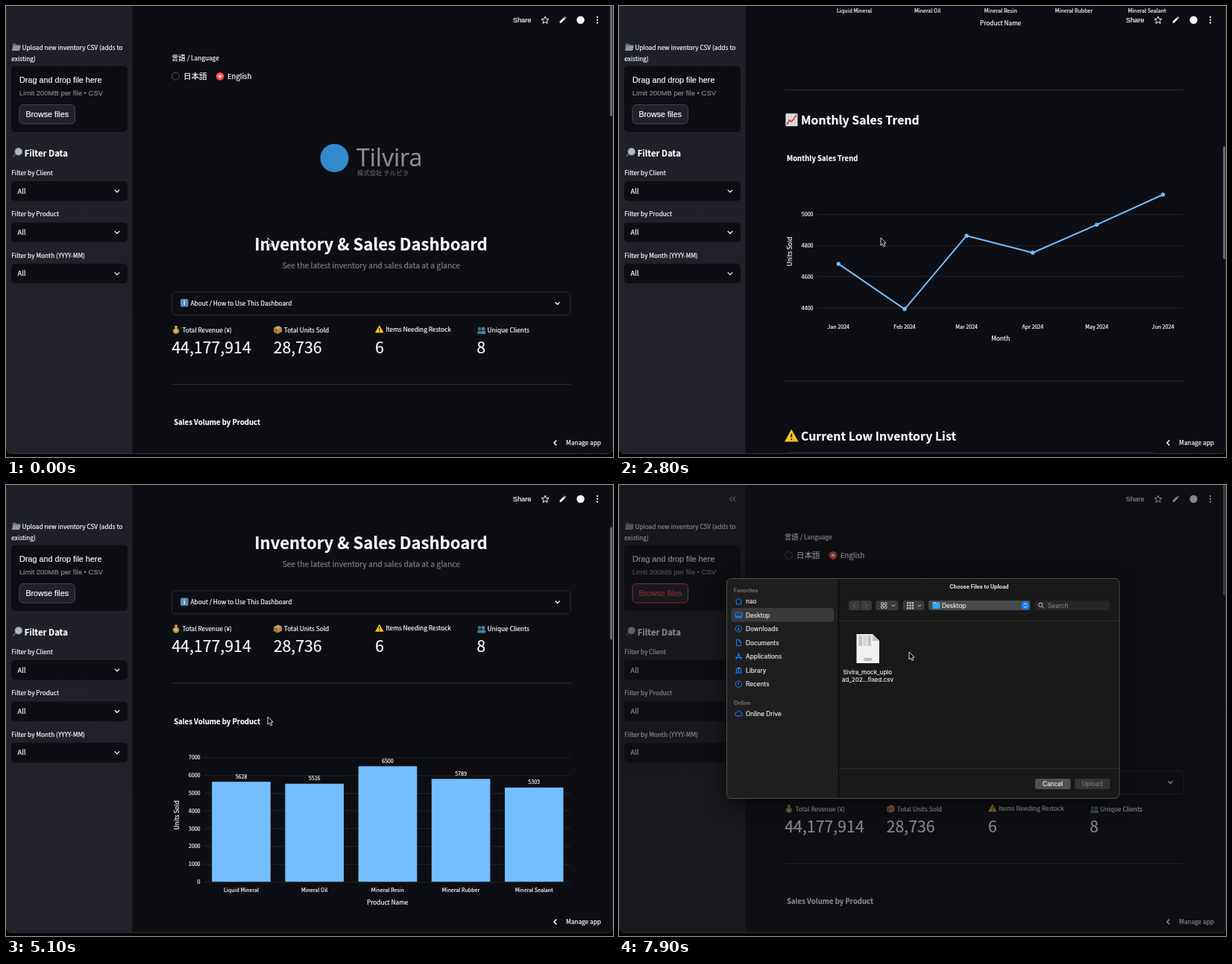
Recreate the animation shown at these times as an HTML page with a canvas. Size 814 px wide and 605 px high, loop 8 s.

```html
<!DOCTYPE html>
<html lang="en">
<head>
<meta charset="utf-8">
<title>Inventory &amp; Sales Dashboard</title>
<style>
html, body { margin: 0; width: 100%; height: 100%; overflow: hidden; background: #000; }
canvas { display: block; width: 814px; height: 605px; }
</style>
</head>
<body>
<canvas id="stage"></canvas>
<script>
const W = 814, H = 605, LOOP = 8000;
const canvas = document.getElementById('stage');
const g = canvas.getContext('2d');
const ratio = window.devicePixelRatio || 1;
canvas.width = W * ratio;
canvas.height = H * ratio;

const BODY = '"Noto Sans CJK JP", "Noto Sans CJK", "Open Sans", sans-serif';
const ARIAL = '"Liberation Sans", Arial, sans-serif';
const UI = 'Inter, Roboto, sans-serif';
const BG = '#0d0e13', WHITE = '#fafafa', RED = '#ff4b4b', BLUE = '#74bdff';
const RULE = '#2c2e35', GRID = '#23252b', MAC_BLUE = '#0a84ff';
const S = 8.27, TICK = 7.1;

// --- helpers ---
// y is the middle of the capital letters; a hairline stroke gives soft, fuller stems
function text(s, x, y, size = S, o = {}) {
  g.font = `${o.weight || 400} ${size}px ${o.font || BODY}`;
  g.textAlign = o.align || 'left';
  g.fillStyle = g.strokeStyle = o.color || WHITE;
  g.lineWidth = 0.2;
  g.lineJoin = 'round';
  g.fillText(s, x, y + size * 0.366);
  g.strokeText(s, x, y + size * 0.366);
}
function box(x, y, w, h, r, fill, stroke) {
  g.beginPath();
  g.roundRect(x, y, w, h, r);
  if (fill) { g.fillStyle = fill; g.fill(); }
  if (stroke) { g.strokeStyle = stroke; g.lineWidth = 1; g.stroke(); }
}
function disc(x, y, r, fill) {
  g.beginPath();
  g.arc(x, y, r, 0, 7);
  g.fillStyle = fill;
  g.fill();
}
function ring(x, y, r, color, width = 1) {
  g.beginPath();
  g.arc(x, y, r, 0, 7);
  g.strokeStyle = color;
  g.lineWidth = width;
  g.stroke();
}
function path(x, y, pts) {
  g.beginPath();
  for (let i = 0; i < pts.length; i += 2) g.lineTo(x + pts[i], y + pts[i + 1]);
}
function poly(x, y, pts, fill) {
  path(x, y, pts);
  g.closePath();
  g.fillStyle = fill;
  g.fill();
}
function line(x, y, pts, color = WHITE, width = 1) {
  path(x, y, pts);
  g.strokeStyle = color;
  g.lineWidth = width;
  g.stroke();
}
const hr = (y, color = RULE, x1 = 222, x2 = 757) => line(x1, y, [0, 0, x2 - x1, 0], color);
const chevron = (x, y, s = 3, color = WHITE, w = 1.3) => line(x, y, [-s, -s / 2, 0, s / 2, s, -s / 2], color, w);
const sideChevron = (x, y, s, dir, color = WHITE, w = 1.3) =>
  line(x, y, [-dir * s / 2, -s, dir * s / 2, 0, -dir * s / 2, s], color, w);
const clamp = (v) => Math.max(0, Math.min(1, v));
const ease = (v) => { v = clamp(v); return v * v * (3 - 2 * v); };
const mix = (a, b, k) => a + (b - a) * k;

// --- motion ---
// time, scroll offset, speed
const SCROLL = [[1650, 0, 0], [2300, 409.5, .62], [3400, 1049, 0], [3700, 1049, 0], [4500, 719, -.55], [5600, 0, 0]];
function scrollAt(t) {
  if (t <= SCROLL[0][0]) return 0;
  for (let i = 1; i < SCROLL.length; i++) {
    const [t0, a, va] = SCROLL[i - 1], [t1, b, vb] = SCROLL[i];
    if (t > t1) continue;
    const d = t1 - t0, k = (t - t0) / d, k2 = k * k, k3 = k2 * k;
    return a * (2 * k3 - 3 * k2 + 1) + b * (3 * k2 - 2 * k3) + d * (va * (k3 - 2 * k2 + k) + vb * (k3 - k2));
  }
  return 0;
}
const OPEN = 7450;
function pointerAt(t) {
  const out = ease((t - 6450) / 650), back = ease((t - 7550) / 320);
  return { x: mix(mix(351, 58, out), 389, back), y: mix(mix(311, 143, out), 224, back) };
}

// --- pictograms ---
function warning(x, y, s) {
  poly(x, y, [s / 2, 0, s, s * .9, 0, s * .9], '#fcc21b');
  line(x + s / 2, y, [0, s * .32, 0, s * .6], '#222', s * .1);
  disc(x + s / 2, y + s * .73, s * .06, '#222');
}
function folder(x, y) {
  poly(x, y, [1, 0, 5, 0, 6, 1.5, 11, 1.5, 10, 9, 0, 9], '#686d72');
  poly(x, y, [2, 3, 12, 3, 10, 9.5, 0, 9.5], '#93989c');
}
function lens(x, y) {
  line(x, y, [5, 8, .8, 12], '#55585d', 2);
  disc(x + 8.3, y + 5.2, 5.2, '#8f9599');
  disc(x + 8.3, y + 5.2, 4, '#b4babd');
}
function moneyBag(x, y) {
  g.beginPath();
  g.ellipse(x + 5, y + 7, 4.3, 4, 0, 0, 7);
  g.fillStyle = '#b58a4c';
  g.fill();
  poly(x, y, [3, 0, 7, 0, 6, 4, 4, 4], '#cfa567');
  disc(x + 5, y + 7, 1.8, '#f0cf62');
}
function carton(x, y) {
  poly(x, y, [0, 3, 6, 0, 11, 2.5, 5, 5.5], '#d6a067');
  poly(x, y, [0, 3, 5, 5.5, 5, 11, 0, 8.5], '#a36f3c');
  poly(x, y, [5, 5.5, 11, 2.5, 11, 8, 5, 11], '#bd8650');
}
function people(x, y) {
  for (const [dx, c] of [[3, '#3f6f92'], [8, '#4f86ab']]) {
    disc(x + dx, y + 3, 2.3, c);
    box(x + dx - 3, y + 5.5, 6, 4.5, [3, 3, 0, 0], c);
  }
}
function trend(x, y) {
  box(x, y, 16, 17, 1, '#dfe3e6');
  for (let i = 1; i < 4; i++) {
    line(x, y, [0, i * 4.2, 16, i * 4.2], '#b4bcc2', .6);
    line(x, y, [i * 4, 0, i * 4, 17], '#b4bcc2', .6);
  }
  line(x, y, [1.5, 15, 5, 9, 8, 11, 14.5, 2], '#d8382f', 1.6);
}
function mail(x, y) {
  box(x, y, 17, 13, 1, '#d5dade');
  line(x, y, [0, 0, 8.5, 7, 17, 0], '#8c959c', 1);
  box(x + 5.5, y + 4, 6, 6, 1, '#3d7cc0');
}

// --- page ---
function intro() {
  text('言語', 222, 69.5, 9.25);
  text('/ Language', 243, 69.5);
  ring(227.5, 94.3, 4.9, '#55575d');
  text('日本語', 238, 94, 10.57);
  disc(287, 94.3, 5.4, RED);
  disc(287, 94.3, 2, '#fff');
  text('English', 297, 94.3, 9.5);

  disc(440.5, 204, 19, '#3389cc');
  text('Tilvira', 470, 203.5, 32, { font: '"Open Sans", sans-serif', color: '#8d8f94' });
  text('株式会社 チルビラ', 471, 223.5, 8.4, { color: '#5c5e63' });

  text('Inventory & Sales Dashboard', 489.5, 319.5, 22, { weight: 700, align: 'center' });
  text('See the latest inventory and sales data at a glance', 489.7, 348, 10.35, { align: 'center', color: '#7b7d83' });

  box(222.5, 383.5, 534.5, 31, 5, null, RULE);
  box(234, 393, 10.5, 10.5, 1.5, '#5b8bb0');
  text('i', 239.2, 398.3, 8, { align: 'center', weight: 700 });
  text('About / How to Use This Dashboard', 247.5, 398.7);
  chevron(739.5, 398.7);

  moneyBag(223, 429);
  carton(359, 429);
  warning(495, 428, 11.5);
  people(632, 430);
  const stats = [['Total Revenue (¥)', '44,177,914'], ['Total Units Sold', '28,736'], ['Items Needing Restock', '6'], ['Unique Clients', '8']];
  stats.forEach(([label, value], i) => {
    const x = 222.3 + i * 136.35;
    text(label, x + 14.2, i === 2 ? 433.5 : 434.6);
    text(value, x, 457.8, 21.3);
  });
  hr(507.5);
}

function axisTitles(name, y, midY) {
  text(name, 511.7, y, S, { align: 'center' });
  g.save();
  g.translate(228.7, midY);
  g.rotate(-Math.PI / 2);
  text('Units Sold', 0, 0, S, { align: 'center' });
  g.restore();
}

const PRODUCTS = [['Liquid Mineral', 5628], ['Mineral Oil', 5516], ['Mineral Resin', 6500], ['Mineral Rubber', 5789], ['Mineral Sealant', 5303]];
function barChart() {
  text('Sales Volume by Product', 225, 558.7, 9.55, { weight: 700 });
  const yOf = (v) => 773.8 - v * 0.02383;
  for (let v = 0; v <= 7000; v += 1000) {
    hr(Math.round(yOf(v)) + .5, GRID, 266);
    text(v, 260.5, yOf(v) + .3, TICK, { align: 'right' });
  }
  PRODUCTS.forEach(([name, v], i) => {
    const x = 276.2 + i * 98.17, mid = x + 39.3;
    g.fillStyle = BLUE;
    g.fillRect(x, yOf(v), 78.6, v * 0.02383);
    text(v, mid, yOf(v) - 7, TICK, { align: 'center' });
    text(name, mid, 785, TICK, { align: 'center' });
  });
  axisTitles('Product Name', 801.5, 684.5);
  hr(891.5);
}

const MONTHS = [['Jan', 0, 4680], ['Feb', 31, 4390], ['Mar', 60, 4860], ['Apr', 91, 4751], ['May', 121, 4931], ['Jun', 152, 5124]];
function lineChart() {
  trend(223.5, 923);
  text('Monthly Sales Trend', 244, 932, 15.9, { weight: 600 });
  text('Monthly Sales Trend', 225, 983, 9.55, { weight: 700 });
  const yOf = (v) => 1183.2 - (v - 4400) * 0.2092;
  const xOf = (day) => 294.3 + day * 2.863;
  for (let v = 4400; v <= 5000; v += 200) {
    hr(Math.round(yOf(v)) + .5, GRID, 266);
    text(v, 260.5, yOf(v) + .5, TICK, { align: 'right' });
  }
  line(0, 0, MONTHS.flatMap(([, d, v]) => [xOf(d), yOf(v)]), BLUE, 2);
  for (const [m, d, v] of MONTHS) {
    disc(xOf(d), yOf(v), 2.7, BLUE);
    text(m + ' 2024', xOf(d), 1208.7, TICK, { align: 'center' });
  }
  axisTitles('Month', 1225, 1108);
  hr(1282);
}

const STOCK = [
  ['Sorano Trading', 'Mineral Resin', 59, 100], ['Kirose Inc', 'Mineral Rubber', 53, 60],
  ['Umeno Partners', 'Mineral Resin', 63, 100], ['Umeno Partners', 'Mineral Oil', 69, 100],
  ['Yukise Co', 'Mineral Sealant', 49, 60], ['Hoshu Materials', 'Mineral Oil', 42, 120]
];
function stockTable() {
  warning(222, 1346.5, 18.5);
  text('Current Low Inventory List', 244, 1356, 15.9, { weight: 600 });
  const top = 1377.5, step = 23.1, edge = '#24262d';
  box(222.5, top, 534.5, 23, [4, 4, 0, 0], '#15171d');
  ['Client', 'Product Name', 'Current Stock', 'Reorder Level'].forEach((s, i) =>
    text(s, [228, 365.5, 503, 632][i], 1389.5, S, { color: '#8a8c92' }));
  STOCK.forEach(([client, product, stock, level], i) => {
    const y = 1412.7 + i * step;
    hr(Math.round(top + 23 + i * step) + .5, edge);
    text(client, 228.3, y);
    text(product, 365.8, y);
    text(stock, 621, y, S, { align: 'right', weight: 700, color: '#c40d0d' });
    text(level, 751, y, S, { align: 'right' });
  });
  for (const x of [360.5, 498.5, 627]) line(x, top, [0, 0, 0, 162], edge);
  box(222.5, top, 534.5, 162, 4, null, edge);
  hr(1576.5);
  mail(223, 1610);
  text('Simulated Email Notification', 244, 1617, 15.9, { weight: 600 });
  box(222, 1639, 535, 60, 5, '#13283d');
}

// --- fixed parts ---
function sidebar(hover, hot) {
  const shade = g.createLinearGradient(0, 0, 0, 600);
  shade.addColorStop(0, '#1e1f27');
  shade.addColorStop(1, '#21222a');
  g.fillStyle = shade;
  g.fillRect(0, 0, 169.5, 601);
  if (hover) for (const x of [150, 154.5]) sideChevron(x, 18.5, 3.2, -1, '#a5a6ab', 1.1);
  folder(8, 50.5);
  text('Upload new inventory CSV (adds to', 21.5, 55.7);
  text('existing)', 7.3, 70.5);
  box(7, 80.5, 156, 88.5, 5, BG);
  text('Drag and drop file here', 18, 99.3, 10.8, { font: ARIAL });
  text('Limit 200MB per file • CSV', 18, 116.3, 9.5, { font: ARIAL, color: '#85878c' });
  box(18, 132.5, 74.5, 25.5, 5, '#20212a', hot ? RED : '#43454c');
  text('Browse files', 55.2, 145.2, 10.7, { font: ARIAL, align: 'center', color: hot ? RED : WHITE });
  lens(8.5, 190);
  text('Filter Data', 24.7, 197.5, 11.35, { weight: 600 });
  ['Client', 'Product', 'Month (YYYY-MM)'].forEach((s, i) => {
    const y = 223.7 + i * 55.4;
    text('Filter by ' + s, 7.3, y);
    box(7, y + 11.3, 156, 26.4, 5, BG);
    text('All', 15.5, y + 24.5, 9.5);
    chevron(149, y + 24.5, 3.2);
  });
}

function toolbar(scroll) {
  text('Share', 679.8, 18.7, 9.25, { font: ARIAL });
  const star = [];
  for (let i = 0; i < 10; i++) {
    const a = i * Math.PI / 5 - Math.PI / 2, r = i % 2 ? 2.3 : 5.2;
    star.push(r * Math.cos(a), r * Math.sin(a));
  }
  path(723, 19.2, star);
  g.closePath();
  g.strokeStyle = WHITE;
  g.lineWidth = 1;
  g.stroke();
  poly(746.5, 18.8, [-4, 4, -4, 2, 1.3, -3.3, 3.3, -1.3, -2, 4], WHITE);
  poly(746.5, 18.8, [1.9, -3.9, 2.8, -4.6, 4.6, -2.8, 3.9, -1.9], WHITE);
  disc(770.5, 18.8, 5.2, WHITE);
  for (const y of [14.9, 18.7, 22.5]) disc(793, y, 1.15, WHITE);
  g.fillStyle = BG;
  g.fillRect(717, 572, 93, 29);
  sideChevron(736.5, 586, 3.4, -1, WHITE, 1.5);
  text('Manage app', 751, 586);
  box(810, -3 + scroll * .246, 5, 151, 2, '#68696d');
}

// --- file chooser ---
function sideIcon(kind, x, y) {
  const c = MAC_BLUE;
  if (kind === 0) { line(x, y, [-4.5, 0, 0, -4, 4.5, 0], c); line(x, y, [-3, 0, -3, 4, 3, 4, 3, 0], c); }
  if (kind === 1) { box(x - 4.5, y - 3.5, 9, 7, 1, null, c); box(x - 4, y + 1, 8, 2, 0, c); }
  if (kind === 2) { ring(x, y, 4.2, c); line(x, y, [0, -2, 0, 2], c); chevron(x, y + 1.2, 1.6, c, 1); }
  if (kind === 3) { line(x, y, [.5, -4, -3, -4, -3, 4, 3, 4, 3, -1.5, .5, -4, .5, -1.5, 3, -1.5], c); }
  if (kind === 4) { line(x, y, [-3.5, 4, .8, -4], c, 1.2); line(x, y, [3.5, 4, -.8, -4], c, 1.2); line(x, y, [-4.5, 1.5, 4.5, 1.5], c, 1.2); }
  if (kind === 5) {
    poly(x, y, [-4.5, -1.5, 0, -4.5, 4.5, -1.5], c);
    for (const d of [-3, 0, 3]) line(x + d, y, [0, -1, 0, 3], c, 1.3);
    line(x, y, [-4.5, 3.7, 4.5, 3.7], c);
  }
  if (kind === 6) { ring(x, y, 4.2, c); line(x, y, [0, -2.5, 0, 0, -2, 0], c); }
  if (kind === 7) {
    g.beginPath();
    g.arc(x - 2.5, y + 1, 2.3, Math.PI / 2, Math.PI * 1.5);
    g.arc(x + .3, y - .8, 2.8, Math.PI * 1.1, Math.PI * 1.9);
    g.arc(x + 3, y + 1.2, 2, -Math.PI / 2, Math.PI / 2);
    g.closePath();
    g.strokeStyle = c;
    g.lineWidth = 1;
    g.stroke();
  }
}

function chooser() {
  const ui = (s, x, y, size = 8.3, o = {}) => text(s, x, y, size, { font: UI, color: '#e6e6e7', ...o });
  g.save();
  g.shadowColor = 'rgba(0,0,0,.6)';
  g.shadowBlur = 24 * ratio;
  g.shadowOffsetY = 6 * ratio;
  box(144.5, 125.5, 526.5, 295, 6, '#191919');
  g.restore();
  box(144.5, 125.5, 150, 295, [6, 0, 0, 6], '#1e1e1f');
  line(294.5, 125.5, [0, 0, 0, 295], '#050505');
  ui('Favorites', 154, 141.5, 7.3, { weight: 600, color: '#6c6c6e' });
  box(150.5, 165, 137.5, 18.5, 4, '#3a3a3c');
  ['nao', 'Desktop', 'Downloads', 'Documents', 'Applications', 'Library', 'Recents'].forEach((s, i) => {
    const y = 156 + i * 18.5;
    sideIcon(i, 160.5, y);
    ui(s, 170, y);
  });
  ui('Online', 154, 292, 7.3, { weight: 600, color: '#6c6c6e' });
  sideIcon(7, 160.5, 306.5);
  ui('Online Drive', 170, 306.7);

  ui('Choose Files to Upload', 483, 136.7, 7.1, { weight: 600, align: 'center' });
  box(308, 155, 15, 13, [3, 0, 0, 3], '#3a3a3c');
  box(324, 155, 15, 13, [0, 3, 3, 0], '#3a3a3c');
  sideChevron(315.5, 161.5, 3, -1, '#77777a', 1);
  sideChevron(331.5, 161.5, 3, 1, '#77777a', 1);
  box(344.5, 155, 30, 13, 3, '#3a3a3c');
  box(380.5, 155, 29, 13, 3, '#3a3a3c');
  for (let i = 0; i < 4; i++) box(351.5 + i % 2 * 4.5, 157.8 + (i >> 1) * 4.5, 3, 3, .5, null, '#cfcfd1');
  for (let i = 0; i < 9; i++) box(386 + i % 3 * 3.4, 157 + Math.floor(i / 3) * 3.5, 2.4, 2.4, .4, '#bdbdc0');
  chevron(368, 161.8, 2.2, '#d8d8da', 1);
  chevron(403, 161.8, 2.2, '#d8d8da', 1);
  box(415, 155, 136.5, 13, 3, '#4a4a4c');
  box(420.5, 157, 10, 9, 1.5, '#35a5e8');
  box(420.5, 157, 5, 2, 1, '#7fcbf4');
  ui('Desktop', 433, 161.5);
  box(540, 156.3, 9.8, 10.4, 2.5, MAC_BLUE);
  chevron(545, 163.6, 2, '#fff', 1);
  line(545, 159.4, [-2, 1, 0, -1, 2, 1], '#fff', 1);
  box(558, 155, 100, 13, 3, '#262628');
  ring(565.3, 160.8, 2.7, '#cfcfd1');
  line(567.3, 162.8, [0, 0, 2.5, 2.5], '#cfcfd1');
  ui('Search', 575, 161.7, 8.3, { color: '#77777a' });
  hr(182.5, '#2b2b2d', 295, 671);
  hr(380.5, '#2b2b2d', 295, 671);

  poly(318.5, 200, [0, 0, 21.5, 0, 30.5, 9, 30.5, 39, 0, 39], '#f1f1f1');
  for (let i = 0; i < 3; i++) box(321.5 + i * 6, 202, 4.5, 14, 0, i % 2 ? '#d3d3d4' : '#bcbcbe');
  for (let i = 0; i < 4; i++) line(321, 204.5 + i * 3.4, [0, 0, 18, 0], '#e2e2e2', .7);
  poly(318.5, 200, [21.5, 0, 30.5, 9, 21.5, 9], '#c4c4c6');
  ui('CSV', 333.7, 233.7, 5.4, { align: 'center', color: '#77777a' });
  ui('tilvira_mock_uplo', 333.5, 250.7, 8, { align: 'center' });
  ui('ad_202…fixed.csv', 333.5, 261, 8, { align: 'center' });

  box(558, 394, 47.5, 14, 3, '#505053');
  ui('Cancel', 581.7, 401, 8.3, { align: 'center' });
  box(611, 394, 47.5, 14, 3, '#343436');
  ui('Upload', 634.7, 401, 8.3, { align: 'center', color: '#767679' });
  box(144.5, 125.5, 526.5, 295, 6, null, '#4b4b4d');
}

function pointer(x, y) {
  path(x, y, [0, 0, 0, 10, 2.3, 8, 4, 11.6, 5.8, 10.8, 4.2, 7.3, 7.2, 7]);
  g.closePath();
  g.fillStyle = '#050505';
  g.fill();
  g.strokeStyle = '#f2f2f2';
  g.lineWidth = .9;
  g.stroke();
}

function draw(t) {
  const scroll = scrollAt(t), p = pointerAt(t), opened = t >= OPEN;
  const hover = opened || p.x < 169;
  const hot = opened || (p.x < 93 && p.y < 159);
  g.setTransform(ratio, 0, 0, ratio, 0, 0);
  g.fillStyle = '#040405';
  g.fillRect(0, 0, W, H);

  g.save();
  g.beginPath();
  g.roundRect(1, -10, 813, 610.5, 6);
  g.clip();
  g.fillStyle = BG;
  g.fillRect(0, 0, W, H);
  g.save();
  g.translate(0, -scroll);
  intro();
  barChart();
  lineChart();
  stockTable();
  g.restore();
  sidebar(hover, hot);
  toolbar(scroll);
  if (opened) {
    g.fillStyle = `rgba(17,17,18,${0.5 * clamp((t - OPEN) / 150)})`;
    g.fillRect(0, 0, W, H);
  }
  g.restore();
  box(.5, -10, 813, 610.5, 6, null, '#2e2e32');

  if (opened) {
    const k = ease((t - OPEN) / 180), s = mix(.85, 1, k);
    g.save();
    g.globalAlpha = k;
    g.translate(408, 273);
    g.scale(s, s);
    g.translate(-408, -273);
    chooser();
    g.restore();
  }
  pointer(p.x, p.y);
}

const start = performance.now();
function tick() {
  draw((performance.now() - start) % LOOP);
  requestAnimationFrame(tick);
}
tick();
</script>
</body>
</html>
```
